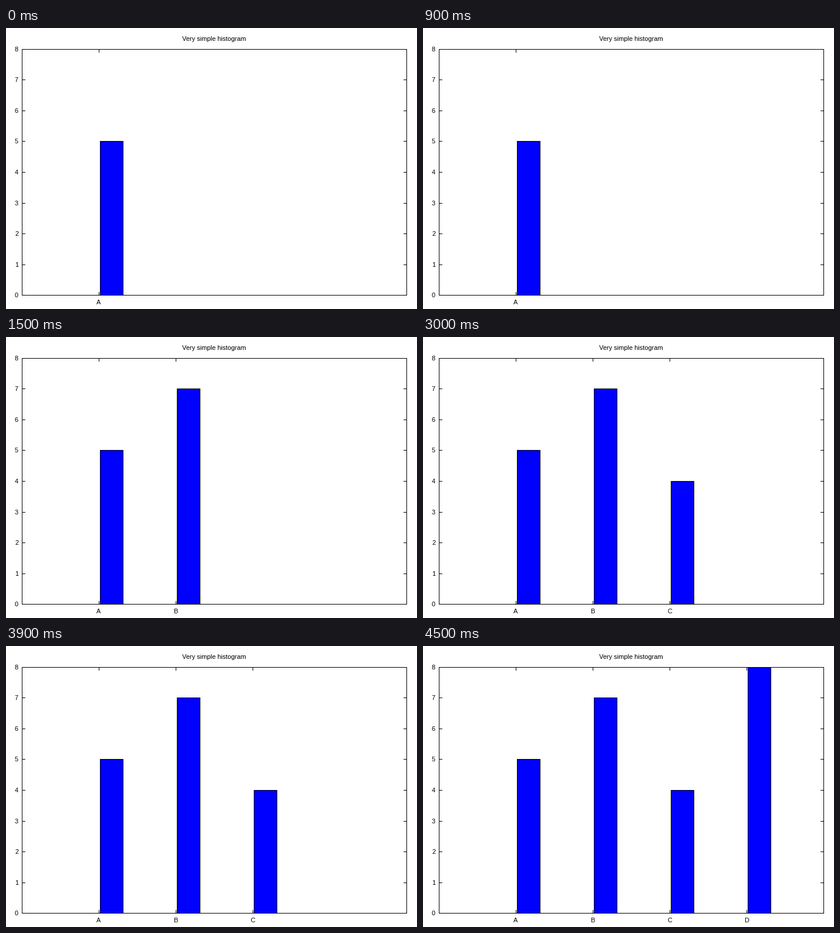
Write a matplotlib script that moves like this. It is 700 px wide and 480 px high and loops after 6000 ms.

```python
import matplotlib.pyplot as plt
from matplotlib.animation import FuncAnimation
from matplotlib.patches import Rectangle

WIDTH, HEIGHT, DPI = 700, 480, 100
LEFT, RIGHT, TOP, BOTTOM = 27, 682, 36, 456
TICK, BAR_WIDTH = 6, 40
STEP_MS = 1500
DATA = {"A": 5, "B": 7, "C": 4, "D": 8}

plt.rcParams["font.family"] = "Liberation Sans"
plt.rcParams["font.size"] = 11 * 72 / DPI

fig = plt.figure(figsize=(WIDTH / DPI, HEIGHT / DPI), dpi=DPI, facecolor="white")
ax = fig.add_axes([0, 0, 1, 1])
ax.set_xlim(0, WIDTH)
ax.set_ylim(HEIGHT, 0)
ax.axis("off")


def box(x, y, w, h, color="black", z=2):
    """Fill a block of whole pixels."""
    return ax.add_patch(Rectangle((x, y), w, h, facecolor=color, linewidth=0,
                                  antialiased=False, zorder=z))


def outline(x0, y0, x1, y1):
    w, h = x1 - x0 + 1, y1 - y0 + 1
    return [box(x0, y0, w, 1), box(x0, y1, w, 1),
            box(x0, y0, 1, h), box(x1, y0, 1, h)]


def label(x, baseline, text, align="center"):
    return ax.text(x, baseline, text, ha=align, va="baseline", color="black")


def value_y(value):
    return round(456.2 - 52.56 * value)


def category(index, name, value):
    """Ticks, label and bar of one category."""
    x = LEFT + 131 * (index + 1)
    y = value_y(value)
    fill = box(x + 2, y, BAR_WIDTH, BOTTOM - y, "blue", z=1)
    return [fill, *outline(x + 2, y, x + 1 + BAR_WIDTH, BOTTOM),
            box(x, TOP, 1, TICK), box(x, BOTTOM - TICK + 1, 1, TICK),
            label(x, 472, name)]


outline(LEFT, TOP, RIGHT, BOTTOM)
label(354.5, 22, "Very simple histogram")
for value in range(9):
    y = value_y(value)
    box(LEFT, y, TICK, 1)
    box(RIGHT - TICK + 1, y, TICK, 1)
    label(21, y + 4, str(value), "right")

categories = [category(i, *item) for i, item in enumerate(DATA.items())]


def update(frame):
    for i, artists in enumerate(categories):
        for artist in artists:
            artist.set_visible(i <= frame)
    return [artist for artists in categories for artist in artists]


anim = FuncAnimation(fig, update, frames=len(DATA), interval=STEP_MS,
                     repeat=True, repeat_delay=0)
plt.show()
```
